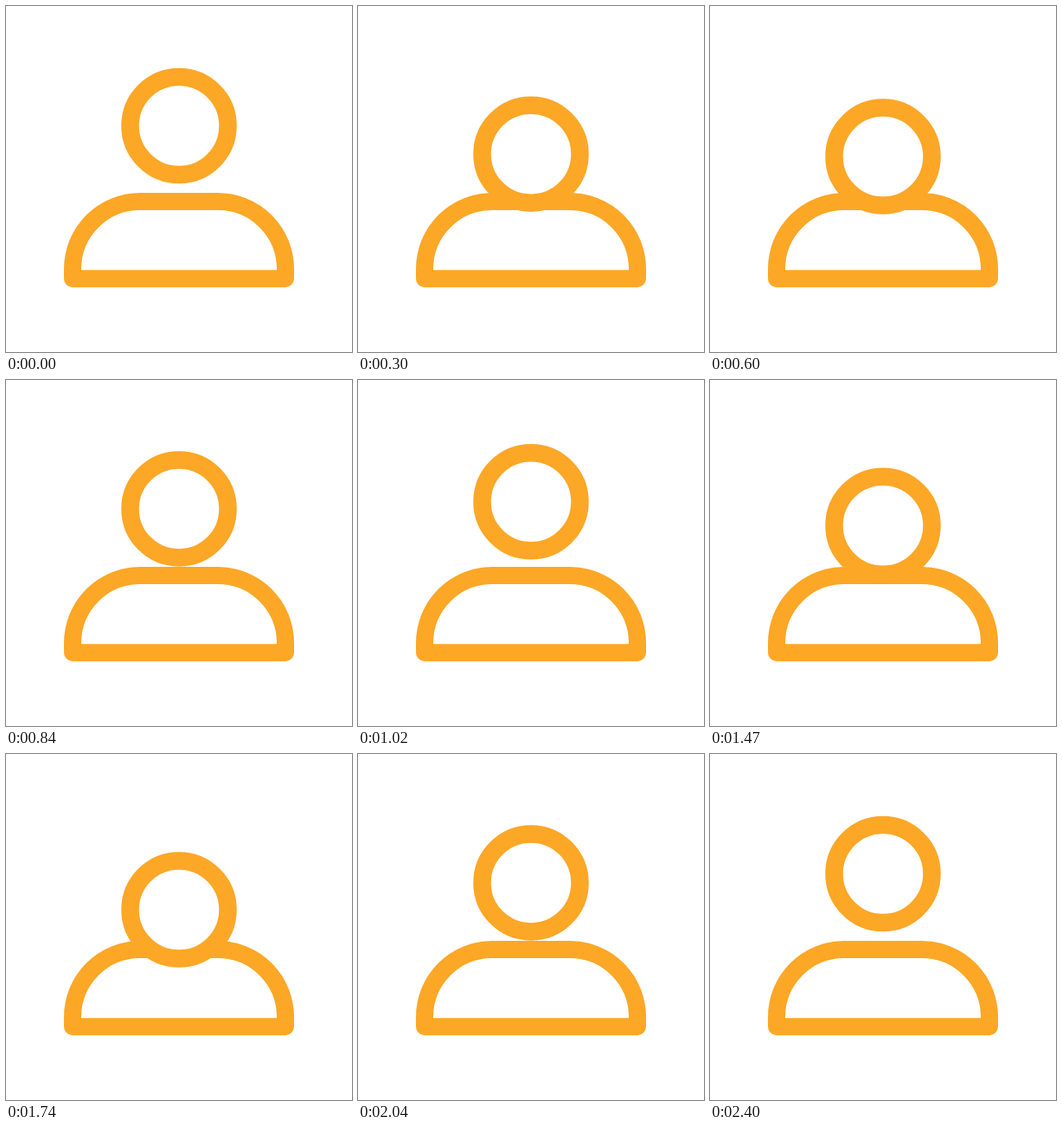
An HTML page for the animation above (2520 ms loop, 400 by 400 pixels).

```html
<!DOCTYPE html>
<html lang="en">
<head>
<meta charset="utf-8">
<title>Nodding user icon</title>
<style>
  html, body { margin: 0; width: 100%; height: 100%; overflow: hidden; background: #fff; }
  svg { display: block; width: 100%; height: 100%; }
</style>
</head>
<body>
<svg viewBox="0 0 400 400" fill="#fff" stroke="#fca726" stroke-width="20" stroke-linejoin="round">
  <path d="M77 315.3V304A78 78 0 0 1 155 226H245A78 78 0 0 1 323 304V315.3Z"/>
  <circle id="head" cx="200" cy="138.5" r="56.5" stroke-width="20.5"/>
</svg>
<script>
  const LOOP = 2520, LAST = 2400, STEP = 30;
  const NOD = 1200, DOWN = 540, DEPTH = 41.5;
  const head = document.getElementById('head');

  // Cubic Bézier easing, solved for x by bisection.
  function bezier(x1, y1, x2, y2) {
    const at = (a, b, s) => 3 * a * s * (1 - s) ** 2 + 3 * b * s * s * (1 - s) + s ** 3;
    return x => {
      let lo = 0, hi = 1;
      for (let i = 0; i < 30; i++) {
        const mid = (lo + hi) / 2;
        if (at(x1, x2, mid) < x) lo = mid; else hi = mid;
      }
      return at(y1, y2, lo);
    };
  }
  const sink = bezier(0.333, 0, 0.333, 1);
  const rise = bezier(0.167, 0.167, 0.333, 1);

  function offset(time) {
    const t = time % NOD;
    return DEPTH * (t < DOWN ? sink(t / DOWN) : 1 - rise((t - DOWN) / (NOD - DOWN)));
  }

  const start = performance.now();
  function draw() {
    const t = (performance.now() - start) % LOOP;
    const time = Math.min(Math.floor(t / STEP) * STEP, LAST);
    head.setAttribute('cy', 138.5 + offset(time));
    requestAnimationFrame(draw);
  }
  draw();
</script>
</body>
</html>
```
